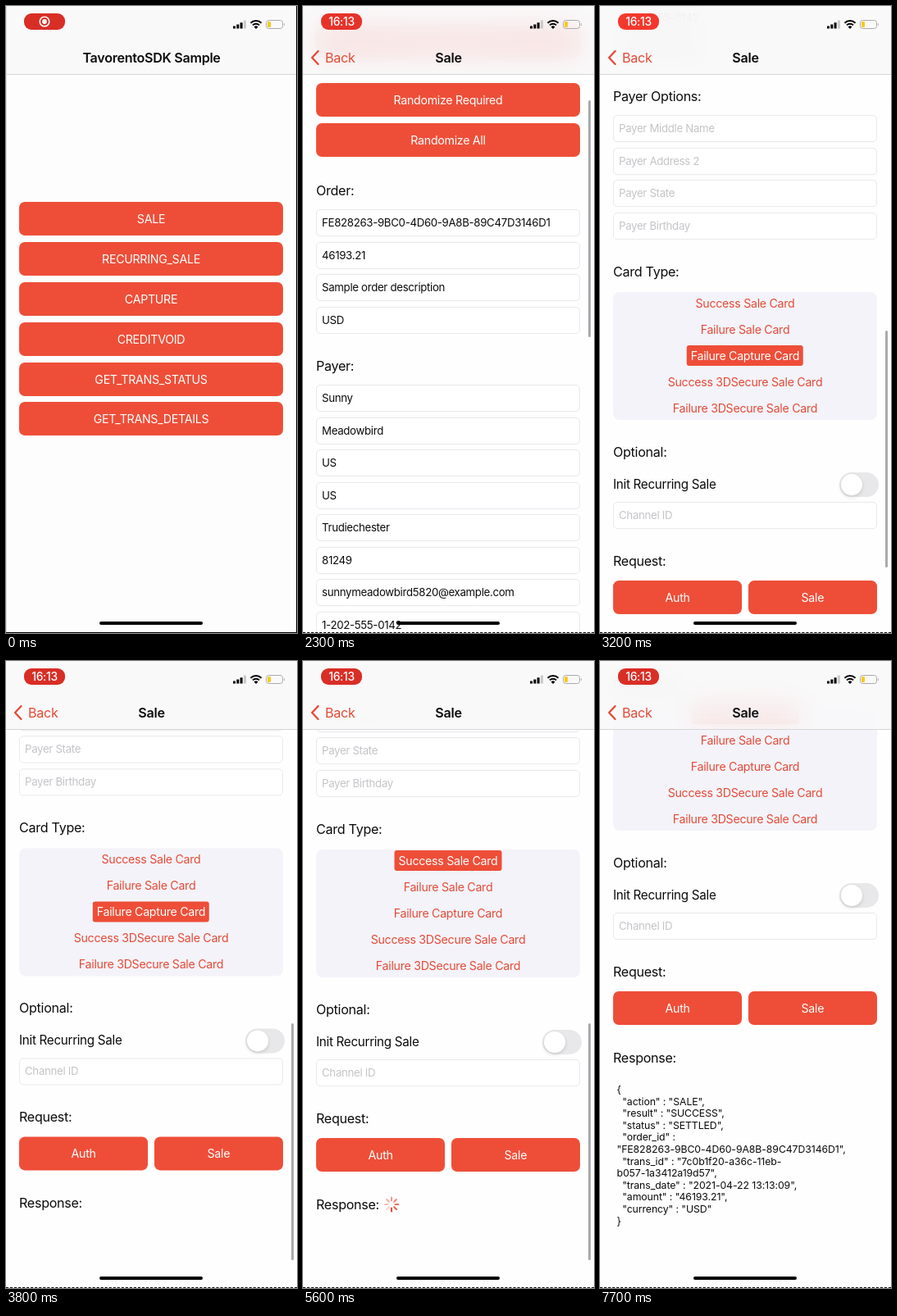
Recreate the animation shown at these times as an HTML page. Size 355 px wide and 765 px high, loop 8 s.

```html
<!DOCTYPE html>
<html lang="en">
<head>
<meta charset="utf-8">
<title>Payment SDK sample</title>
<style>
  html, body { margin: 0; width: 100%; height: 100%; overflow: hidden; background: #fff; }
  body { font: 14.2px Inter, sans-serif; letter-spacing: -.02em; color: #0b0b0c; }
  #stage { position: relative; width: 355px; height: 765px; overflow: hidden; }
  #stage div, svg { position: absolute; box-sizing: border-box; white-space: pre; }
  .page { left: 0; top: 0; width: 355px; height: 765px; overflow: hidden; background: #fdfdfd; }
  #sale { background: #fefefe; box-shadow: 0 0 8px #0002; }
  #scroll { left: 0; top: .6px; width: 355px; }
  .text { height: 20px; line-height: 20px; }
  .label { font-size: 16.1px; }
  .button { height: 41px; line-height: 41px; border-radius: 7px; background: #ee4e38; color: #fff; text-align: center; }
  .field { left: 16px; width: 322px; height: 33px; line-height: 31px; padding-left: 6px; font-size: 13.25px;
           letter-spacing: -.024em; border: 1px solid #e9e9ee; border-radius: 5px; background: #fff; color: #c4c4c8; }
  .filled { color: #0b0b0c; }
  #cards { left: 16px; top: 1165px; width: 322px; height: 156px; border-radius: 8px; background: #f3f3f9; }
  .card { left: 50%; transform: translateX(-50%); height: 25px; line-height: 25px; padding: 0 5px; border-radius: 3px; color: #e54a36; }
  .card.on { background: #ee4e38; color: #fff; }
  #switch { left: 292px; top: 1385px; width: 48px; height: 30px; border-radius: 15px; background: #e8e8ea; }
  #thumb { left: 2px; top: 2px; width: 26px; height: 26px; border-radius: 13px; background: #fff; box-shadow: 0 2px 5px #0002; }
  #json { left: 20.5px; top: 1630.5px; font-size: 12.3px; line-height: 14.6px; letter-spacing: -.008em; }
  #bar { left: 347.6px; width: 3px; height: 289px; border-radius: 2px; background: #aaaaad; }
  #nav { left: 0; top: 0; width: 355px; height: 84px; background: rgba(249,249,250,.88);
         backdrop-filter: blur(16px); border-bottom: 1px solid #d6d6d8; }
  .title { left: 0; top: 53px; width: 355px; text-align: center; font-size: 16.1px; font-weight: 600; }
  #back { left: 27px; top: 53px; font-size: 16.1px; color: #e54a36; }
  #pill { left: 22px; top: 9px; width: 50px; height: 20px; border-radius: 9px; }
  #clock { left: 0; top: 0; width: 50px; text-align: center; color: #fff; font-size: 13.8px; font-weight: 500; }
  #home-bar { left: 114px; top: 750.7px; width: 126px; height: 4.7px; border-radius: 3px; background: #000; }
  #edge { left: 0; top: 0; width: 355px; height: 765px; border: solid #000; border-width: 0 1px 1px 0; box-shadow: inset 1px 0 #dedee0; }
  #edge.scrolled { border-width: 0 0 1px; border-style: dashed; box-shadow: none; }
</style>
</head>
<body>
<div id="stage">
  <div id="home" class="page"></div>
  <div id="sale" class="page">
    <div id="scroll">
      <div id="cards"></div>
      <div id="switch"><div id="thumb"></div></div>
      <svg id="spinner" style="left:98px;top:1588px" width="20" height="20" viewBox="-10 -10 20 20"
           stroke="#e54a36" stroke-width="2" stroke-linecap="round"></svg>
      <div id="json">{
  "action" : "SALE",
  "result" : "SUCCESS",
  "status" : "SETTLED",
  "order_id" :
"FE828263-9BC0-4D60-9A8B-89C47D3146D1",
  "trans_id" : "7c0b1f20-a36c-11eb-
b057-1a3412a19d57",
  "trans_date" : "2021-04-22 13:13:09",
  "amount" : "46193.21",
  "currency" : "USD"
}</div>
    </div>
    <div id="bar"></div>
  </div>
  <div id="nav">
    <div id="home-title" class="text title">TavorentoSDK Sample</div>
    <div id="sale-title" class="text title">Sale</div>
    <div id="back" class="text">Back</div>
    <svg id="chevron" style="left:8px;top:52px" width="14" height="22" fill="none" stroke="#e54a36" stroke-width="2.3"
         stroke-linecap="round" stroke-linejoin="round"><path d="M10.5 3 3 11l7.5 8"/></svg>
    <div id="pill">
      <svg id="record" style="left:18px;top:3px" width="14" height="14" fill="none" stroke="#fff" stroke-width="1.5">
        <circle cx="7" cy="7" r="5.8"/><circle cx="7" cy="7" r="2.9" fill="#fff" stroke="none"/></svg>
      <div id="clock" class="text">16:13</div>
    </div>
    <svg style="left:270px;top:12px" width="76" height="20">
      <path d="M7 12.5h3v3H7zM11.3 10.5h3v5h-3zM15.6 8.2h3v7.3h-3z"/>
      <path d="M19.9 5.5h3v10h-3z" fill="#c9c9cb"/>
      <g fill="none" stroke="#000" stroke-width="2"><path d="M28.5 8.8a9.2 9.2 0 0 1 13 0M31 11.4a5.6 5.6 0 0 1 8 0"/></g>
      <path d="M35 16l-2.4-2.6a3.5 3.5 0 0 1 4.8 0z"/>
      <rect x="47.5" y="5.5" width="20" height="10" rx="3" fill="none" stroke="#aaaaac"/>
      <rect x="49" y="7" width="4" height="7" rx="1.3" fill="#f8c91c"/>
      <path d="M69 8.8q2 1.7 0 3.6z" fill="#aaaaac"/>
    </svg>
  </div>
  <div id="home-bar"></div>
  <div id="edge"></div>
</div>
<script>
const $ = id => document.getElementById(id);
const clamp = (v, lo = 0, hi = 1) => Math.min(hi, Math.max(lo, v));
const progress = (t, start, length) => clamp((t - start) / length);

function add(parent, className, text, style) {
  const el = document.createElement('div');
  el.className = className;
  el.textContent = text;
  for (const key in style) el.style[key] = style[key] + 'px';
  parent.append(el);
  return el;
}
// Returns the caption so that it can be dimmed on press.
function button(parent, text, top, left = 16, width = 322) {
  const box = add(parent, 'button', '', { top, left, width });
  return add(box, '', text, { left: 0, width });
}

const home = $('home'), scroll = $('scroll');
const homeButtons = ['SALE', 'RECURRING_SALE', 'CAPTURE', 'CREDITVOID', 'GET_TRANS_STATUS', 'GET_TRANS_DETAILS']
  .map((name, i) => button(home, name, 239.4 + 48.8 * i));

button(scroll, 'Clear Transaction', 98.5);
const randomize = button(scroll, 'Randomize Required', 169.5);
button(scroll, 'Randomize All', 218.5);
button(scroll, 'Auth', 1517, 16, 157.3);
const saleButton = button(scroll, 'Sale', 1517, 180.7, 157.3);

const labels = { Order: 300, Payer: 514, 'Payer Options': 926, 'Card Type': 1140, Optional: 1360, Request: 1493, Response: 1598 };
for (const name in labels) add(scroll, 'text label', name + ':', { left: 16, top: labels[name] - 10 });
add(scroll, 'text', 'Init Recurring Sale', { left: 16, top: 1390, fontSize: 15.2 });

const fields = [];
function group(prefix, y, entries) {
  entries.forEach(([name, value], i) => {
    const hint = prefix + name;
    fields.push({ el: add(scroll, 'field', hint, { top: y - 16.5 + 39.5 * i }), hint, value });
  });
}
group('Order ', 340, [['ID', 'FE828263-9BC0-4D60-9A8B-89C47D3146D1'], ['Amount', '46193.21'],
  ['Description', 'Sample order description'], ['Currency Code', 'USD']]);
group('Payer ', 554, [['First Name', 'Sunny'], ['Last Name', 'Meadowbird'], ['Contry', 'US'], ['Country Code', 'US'],
  ['City', 'Trudiechester'], ['Zip', '81249'], ['Email', 'sunnymeadowbird5820@example.com'],
  ['Phone', '1-202-555-0142'], ['IP', '254.254.254.254']]);
group('Payer ', 966, [['Middle Name'], ['Address 2'], ['State'], ['Birthday']]);
group('Channel ', 1437.6, [['ID']]);

const cards = ['Success Sale', 'Failure Sale', 'Failure Capture', 'Success 3DSecure Sale', 'Failure 3DSecure Sale']
  .map((name, i) => add($('cards'), 'card', name + ' Card', { top: 1.6 + 31.9 * i }));

const spokes = Array.from({ length: 8 }, (_, i) => {
  const line = document.createElementNS('http://www.w3.org/2000/svg', 'path');
  line.setAttribute('d', 'M0-4.5V-8.4');
  line.setAttribute('transform', `rotate(${i * 45})`);
  $('spinner').append(line);
  return line;
});

// Drag, then exponential deceleration, a small bounce, and the jump to the response.
function scrollAt(t) {
  if (t < 2500) return 287 * progress(t, 2090, 410) ** 2;
  if (t < 3800) return 990 - 386 * Math.exp((2800 - t) / 500);
  if (t < 6560) return 936 + 1.6 * (1 - progress(t, 3800, 200));
  const p = progress(t, 6560, 360);
  return 936 + 179 * p * p * (3 - 2 * p);
}
const pressed = (t, down, up) => t < down ? 1 : t < up ? .25 : .25 + .75 * progress(t, up, 250);

function draw(t) {
  const push = 1 - (1 - progress(t, 480, 650)) ** 4;
  home.style.transform = `translateX(${-107 * push}px)`;
  home.style.filter = `brightness(${1 - .1 * push})`;
  $('sale').style.transform = `translateX(${355 * (1 - push)}px)`;
  $('sale').style.visibility = push ? 'visible' : 'hidden';
  $('home-title').style.transform = `translateX(${-130 * push}px)`;
  $('home-title').style.opacity = clamp(1 - 1.4 * push);
  $('sale-title').style.transform = `translateX(${178 * (1 - push)}px)`;
  $('back').style.transform = `translateX(${110 * (1 - push)}px)`;
  for (const id of ['sale-title', 'back', 'chevron']) $(id).style.opacity = push;

  homeButtons[0].style.opacity = pressed(t, 300, 450);
  randomize.style.opacity = pressed(t, 1400, 1550);
  saleButton.style.opacity = pressed(t, 4800, 4950);

  for (const { el, hint, value } of fields) {
    const filled = value && t >= 1550;
    el.textContent = filled ? value : hint;
    el.classList.toggle('filled', !!filled);
  }
  const chosen = t < 4300 ? 2 : 0;
  cards.forEach((card, i) => card.classList.toggle('on', i === chosen));

  const offset = scrollAt(t);
  scroll.style.transform = `translateY(${-offset}px)`;
  $('bar').style.top = Math.min(442, 86 + .38 * offset) + 'px';
  $('bar').style.opacity = progress(t, 2080, 60) * (1 - progress(t, 6600, 250));
  $('edge').classList.toggle('scrolled', t >= 2100);

  $('spinner').style.display = t >= 4950 && t < 6600 ? '' : 'none';
  const head = Math.floor(t / 125);
  spokes.forEach((spoke, i) => spoke.style.opacity = 1 - .11 * ((head - i + 800) % 8));
  $('json').style.display = t >= 6600 ? '' : 'none';

  const glow = .5 - .5 * Math.cos(t / 1900 * 2 * Math.PI);
  $('pill').style.background = `rgb(${216 + 38 * glow},${46 + 14 * glow},${38 + 10 * glow})`;
  $('record').style.opacity = t < 1700 ? 1 : 0;
  $('clock').style.opacity = t < 1700 ? 0 : 1;
}

function tick() {
  draw(performance.now() % 8000);
  requestAnimationFrame(tick);
}
tick();
</script>
</body>
</html>
```
